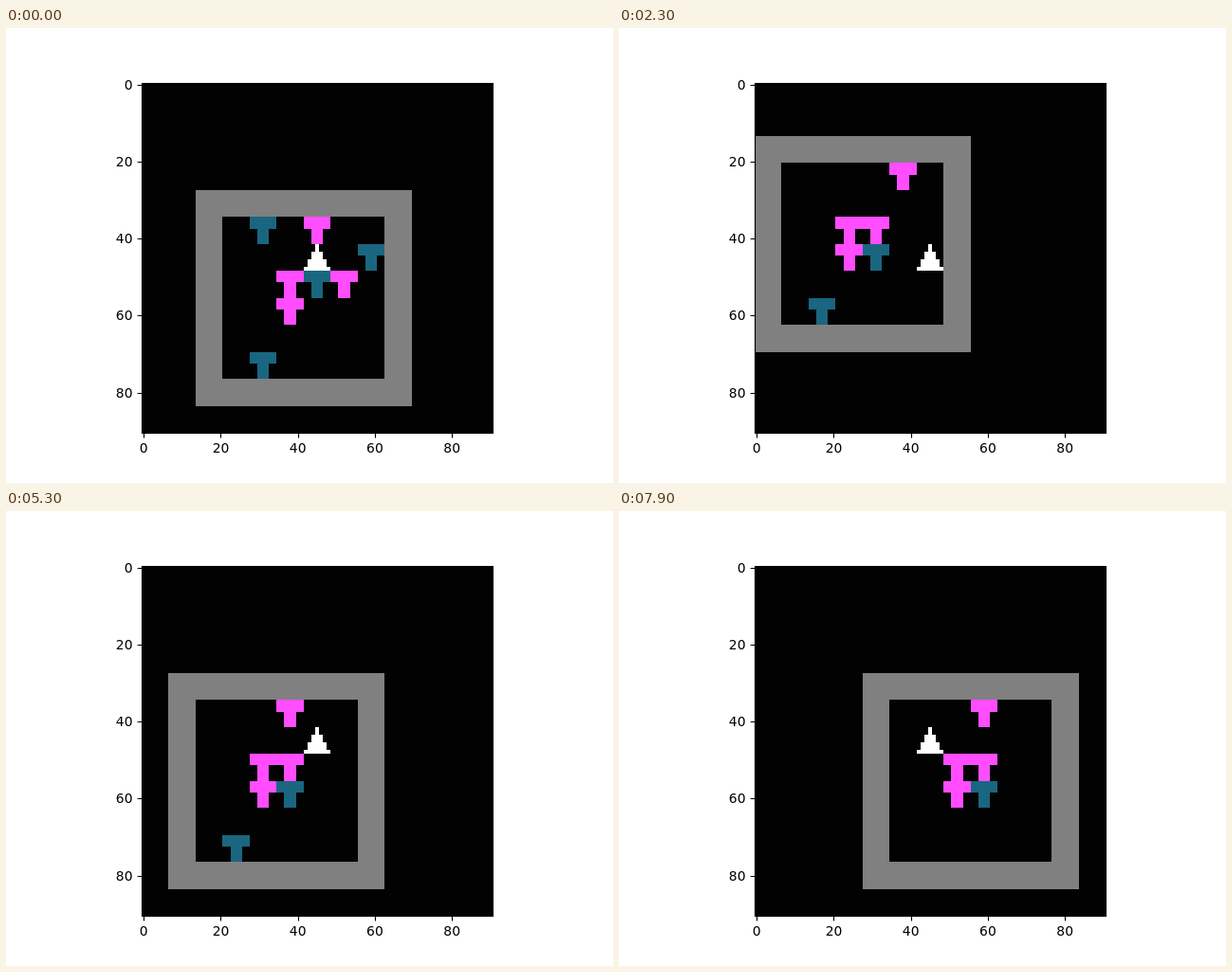
An HTML page for the animation above (8000 ms loop, 640x480 px).

```html
<!DOCTYPE html>
<html lang="en">
<head>
<meta charset="utf-8">
<title>Grid walk</title>
<style>
  html, body { margin: 0; width: 100%; height: 100%; overflow: hidden; background: #fff; }
  svg { display: block; }
  text { font: 13.889px "DejaVu Sans", sans-serif; }
</style>
</head>
<body>
<svg width="640" height="480" viewBox="0 0 640 480">
  <clipPath id="view"><rect x="143" y="58" width="371" height="370"/></clipPath>
  <rect x="143" y="58" width="371" height="370" fill="#020202"/>
  <g clip-path="url(#view)" shape-rendering="crispEdges">
    <path id="wall" fill="#808080"/>
    <path id="pink" fill="#ff4dff"/>
    <path id="teal" fill="#1a6680"/>
    <path id="agent" fill="#fff"/>
  </g>
  <rect x="143.5" y="58.5" width="370" height="369" fill="none" stroke="#000" stroke-width="1.11"/>
  <g id="axes"></g>
</svg>
<script>
const STEP = 100, CELL = 7, CENTER = 6, SIZE = 8;
const DIRS = { L: [-1, 0], R: [1, 0], U: [0, -1], D: [0, 1], '.': [0, 0] };
const MOVES =
  '.LLURUURDD' + 'URRDLLDLRU' + 'LDLRULRLLL' + 'ULLURDLRDR' +
  'RRULRLUDDR' + 'ULRLDRDLLD' + 'LDLULUDDDU' + 'ULURRRLLUR';
const START = {
  agent: [4, 2],
  pink: [[4, 1], [3, 3], [5, 3], [3, 4]],
  teal: [[2, 1], [6, 2], [4, 3], [2, 6]]
};

// Shapes inside one cell: x, y, width, height in units
const TEE = [[0, 0, 7, 3], [2, 3, 3, 4]];
const SPIRE = [[3, 0, 1, 2], [2, 2, 3, 2], [1, 4, 5, 2], [0, 6, 7, 1]];

const byId = id => document.getElementById(id);
const px = u => Math.round(143 + u * 370 / 91);
const py = u => Math.round(57 + u * 370 / 91);
const box = (x, y, w, h) =>
  `M${px(x)} ${py(y)}H${px(x + w)}V${py(y + h)}H${px(x)}Z`;
const shape = (parts, col, row) =>
  parts.map(([x, y, w, h]) => box(col * CELL + x, row * CELL + y, w, h)).join('');

const isWall = (x, y) => x < 1 || y < 1 || x > SIZE - 2 || y > SIZE - 2;
const find = (list, x, y) => list.findIndex(p => p[0] === x && p[1] === y);

// Walk one cell, pushing a single block; a teal block squeezed on a wall vanishes
function move({ agent, pink, teal }, [dx, dy]) {
  const next = { agent, pink: pink.slice(), teal: teal.slice() };
  const [x, y] = [agent[0] + dx, agent[1] + dy];
  if (isWall(x, y)) return next;
  const kind = ['pink', 'teal'].find(k => find(next[k], x, y) >= 0);
  if (kind) {
    const list = next[kind], i = find(list, x, y);
    const [bx, by] = [x + dx, y + dy];
    if (isWall(bx, by)) {
      if (kind === 'pink') return next;
      list.splice(i, 1);
    } else if (find(pink.concat(teal), bx, by) >= 0) {
      return next;
    } else {
      list[i] = [bx, by];
    }
  }
  next.agent = [x, y];
  return next;
}

const states = [];
[...MOVES].reduce((s, m) => {
  const next = move(s, DIRS[m]);
  states.push(next);
  return next;
}, START);

function draw({ agent, pink, teal }) {
  const left = CENTER - agent[0], top = CENTER - agent[1];
  const x = left * CELL, y = top * CELL, full = SIZE * CELL, side = full - CELL;
  const tees = list => list.map(([c, r]) => shape(TEE, left + c, top + r)).join('');
  const set = (id, d) => byId(id).setAttribute('d', d);
  set('wall', box(x, y, full, CELL) + box(x, y + side, full, CELL) +
    box(x, y, CELL, full) + box(x + side, y, CELL, full));
  set('pink', tees(pink));
  set('teal', tees(teal));
  set('agent', shape(SPIRE, CENTER, CENTER));
}

function drawAxes() {
  const unit = 369.6 / 91;
  let out = '';
  for (let v = 0; v <= 80; v += 20) {
    const x = 143.2 + (v + 0.5) * unit, y = 57.6 + (v + 0.5) * unit;
    const tx = Math.round(x) + 0.5, ty = Math.round(y) + 0.5;
    out += `<path d="M${tx} 427.5V432.4M143.5 ${ty}H138.6" stroke="#000" stroke-width="1.11"/>` +
      `<text x="${x}" y="448" text-anchor="middle">${v}</text>` +
      `<text x="133.5" y="${Math.round(y + 5)}" text-anchor="end">${v}</text>`;
  }
  byId('axes').innerHTML = out;
}

let shown = -1;
function frame() {
  const i = Math.floor(performance.now() / STEP) % states.length;
  if (i !== shown) draw(states[shown = i]);
  requestAnimationFrame(frame);
}
drawAxes();
frame();
</script>
</body>
</html>
```
